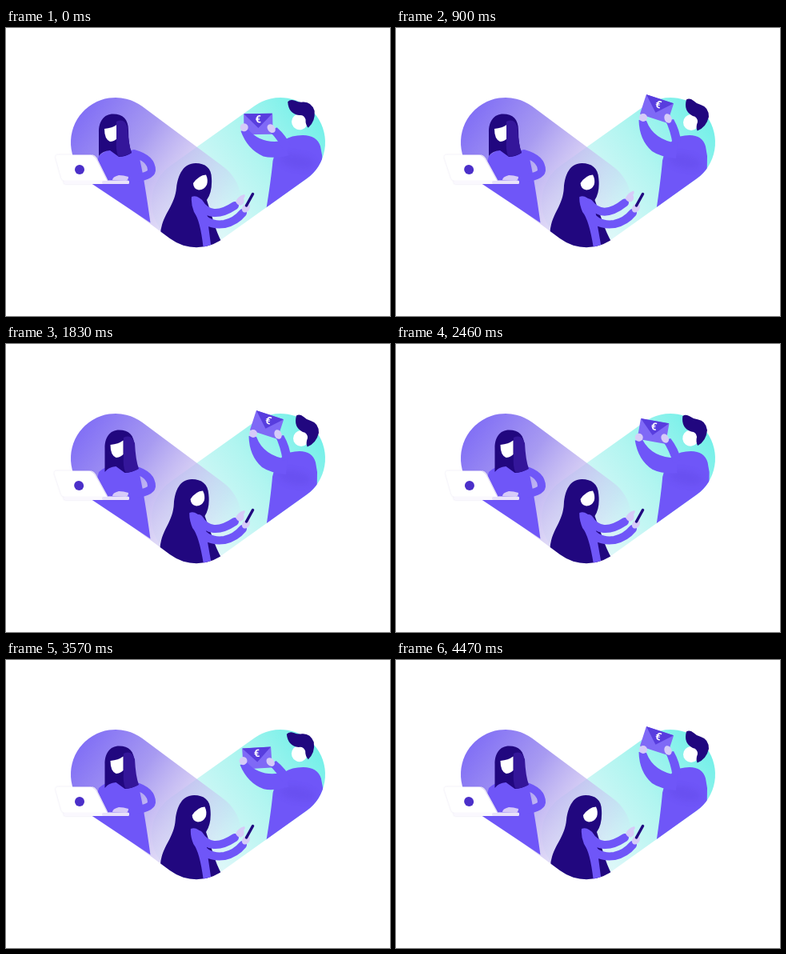
An HTML page that plays this animation: 480 by 360 pixels, repeating every 4500 ms.

```html
<!DOCTYPE html>
<html lang="en">
<head>
<meta charset="utf-8">
<title>Three people</title>
<style>
  @property --low  { syntax: "<number>"; inherits: true; initial-value: 0; }
  @property --turn { syntax: "<number>"; inherits: true; initial-value: 0; }
  @property --lean { syntax: "<number>"; inherits: true; initial-value: 0; }
  @property --tap  { syntax: "<number>"; inherits: true; initial-value: 0; }
  @property --pull { syntax: "<number>"; inherits: true; initial-value: 0; }
  @property --lid  { syntax: "<number>"; inherits: true; initial-value: 0; }

  html, body { margin: 0; width: 100%; height: 100%; overflow: hidden; background: #fff; }

  svg {
    display: block; width: 480px; height: 360px;
    animation: 4.5s ease-in-out infinite;
    animation-name: low, turn, lean, tap, pull, lid;
  }
  svg * { transform-box: view-box; }

  /* man: 1 = envelope lowered */
  @keyframes low {
    0% { --low: .79; animation-timing-function: cubic-bezier(.3, .3, .6, 1); }
    12.4%, 48% { --low: 0; }
    64.7%, 75.6% { --low: 1; }
    92.2%, 100% { --low: 0; }
  }
  /* laptop woman: 1 = looking right */
  @keyframes turn { 0%, 25.5% { --turn: 0; } 39%, 100% { --turn: 1; } }
  /* phone woman: 1 = leaning back */
  @keyframes lean {
    0%, 5% { --lean: 0; }
    18%, 72% { --lean: 1; }
    85%, 100% { --lean: 0; }
  }
  @keyframes tap  { 0%, 14% { --tap: 0; } 20% { --tap: 1; } 26%, 100% { --tap: 0; } }
  @keyframes pull { 0%, 81% { --pull: 0; } 86.7% { --pull: 1; } 93%, 100% { --pull: 0; } }
  @keyframes lid {
    0% { --lid: 0; }
    12%, 48% { --lid: 1; }
    56%, 85% { --lid: 0; }
    96%, 100% { --lid: 1; }
  }

  /* parts of the man turn about their own joint and drift by --x, --y when lowered */
  .swing {
    transform-origin: var(--joint);
    transform: translate(calc(var(--low) * var(--x)), calc(var(--low) * var(--y))) rotate(calc(var(--low) * -24deg));
  }
  .head     { --joint: 369px 119px; --x: -2px; --y: -1px; }
  .near     { --joint: 340px 152px; --x: 0px; --y: 0px; }
  .far      { --joint: 354px 146px; --x: 2px; --y: 8px; }
  .envelope { --joint: 326px 101px; --x: -13.5px; --y: 24px; }
  .body     { transform-origin: 328px 222px; transform: scaleX(calc(1 + var(--low) * .13)); }

  .look { transform: translateX(calc(var(--turn) * 7.5px)); }
  .lock { transform: translateX(calc(var(--turn) * 1.5px)); }
  .sway { transform-origin: 240px 270px; transform: skewX(calc(var(--lean) * 2.6deg)); }
  .tap  { transform-origin: 245px 220px;
          transform: translate(calc(var(--pull) * -5px), calc(var(--pull) * 1.5px)) rotate(calc(var(--tap) * -5deg)); }
  .lid  { transform-origin: 100px 193px; transform: skewX(calc(var(--lid) * 3deg)); }

  .dark { fill: #21077f; }
  .violet { fill: #6f56f8; }
  .skin { fill: #d6cbf8; }
  .white { fill: #fff; }
  .arm { fill: none; stroke: #6f56f8; stroke-width: 10; stroke-linecap: round; }
  .soft { filter: drop-shadow(0 0 1px rgba(90, 70, 170, .15)); }
  text { font: 700 13px Roboto, Arial, sans-serif; text-anchor: middle; fill: #fff; }
</style>
</head>
<body>
<svg viewBox="0 0 480 360">
  <defs>
    <linearGradient id="lilac" gradientUnits="userSpaceOnUse" x1="-56" x2="175">
      <stop offset="0" stop-color="#8270f5"/>
      <stop offset=".35" stop-color="#a89bf1"/>
      <stop offset=".62" stop-color="#c3b8f0" stop-opacity=".7"/>
      <stop offset=".85" stop-color="#c9c2f2" stop-opacity=".3"/>
      <stop offset="1" stop-color="#d6d2f6" stop-opacity="0"/>
    </linearGradient>
    <linearGradient id="aqua" gradientUnits="userSpaceOnUse" x1="-56" x2="170">
      <stop offset="0" stop-color="#74f0e9"/>
      <stop offset=".4" stop-color="#b0f5f0"/>
      <stop offset=".75" stop-color="#d6f7f7"/>
      <stop offset="1" stop-color="#f1fafc"/>
    </linearGradient>
    <filter id="blur" x="-50%" y="-50%" width="200%" height="200%"><feGaussianBlur stdDeviation="4"/></filter>
    <rect id="left" x="-56" y="-56" width="238" height="112" rx="56" transform="translate(137 143) rotate(36.6)"/>
    <rect id="right" x="-56" y="-56" width="241" height="112" rx="56" transform="translate(343 143) rotate(144.5)"/>
    <clipPath id="heart"><use href="#left"/><use href="#right"/></clipPath>
  </defs>

  <use href="#right" fill="url(#aqua)"/>
  <use href="#left" fill="url(#lilac)"/>

  <!-- woman with laptop -->
  <path class="violet" d="M116 160Q124 153 134 151H152Q166 154 168 168Q173 190 180.500 243.500L107 194.500Z"/>
  <path class="arm" d="M160 157Q182 163 182 178Q181 187 152 188"/>
  <g class="look">
    <path class="dark" d="M134 107.500C122 107.500 116 117 116 130V160Q120 154 130 153L141 161Q150 161 157 156Q153 146 153 128C153 114 146 107.500 134 107.500Z"/>
    <path class="white" d="M123 126Q133 125 139 120.500V138Q135 142 130 142Q123 139 123 126Z"/>
    <path class="lock" fill="#34169a" d="M138 117Q148 112 152 124Q153 145 157 156Q149 161 140 160Q137 152 138 140Z"/>
  </g>
  <g class="soft">
    <g class="lid">
      <path class="white" d="M65 158.500H106Q111 158.500 113 162L127 191H74Q70 191 69 187L62 162Q62 158.500 65 158.500Z"/>
      <path fill="none" stroke="#e2ddf5" stroke-width="1.500" d="M108 159Q111 160 113 163L126.500 190"/>
      <circle cx="92" cy="177" r="6" fill="#4b2fc9"/>
    </g>
    <rect x="72" y="190.500" width="82" height="4.500" rx="2" fill="#faf8fe"/>
  </g>
  <path class="skin" d="M153 186Q147 184 141 184Q133 186 133 190L150 191Q153 190 153 186Z"/>
  <rect x="120" y="191" width="34" height="4" rx="2" fill="#e8e2fa"/>

  <!-- man with envelope -->
  <g clip-path="url(#heart)">
    <g class="body">
      <path class="violet" d="M333 166Q336 150 346 140Q354 134 367 134Q383 134 387 148L389 160L388 230H325Q331 190 333 166Z"/>
      <ellipse cx="361" cy="167" rx="20" ry="8" fill="#4f39cf" opacity=".18" filter="url(#blur)" transform="rotate(12 361 167)"/>
    </g>
  </g>
  <g class="swing head">
    <circle class="white" cx="369" cy="118" r="10"/>
    <path class="dark" d="M363 89.500Q367 87 372 91Q376 95 381 96Q391 99 391 111Q388 124 376.600 128.600Q374.500 124 377 117.500Q377 111 371 110Q359 104 363 89.500Z"/>
  </g>
  <g class="swing envelope">
    <g transform="translate(326 101) rotate(18)">
      <rect x="-18" y="-13" width="36" height="26" rx="1" fill="#7f69f6"/>
      <path fill="#583dde" d="M-18 -13L0 5L18 -13Z"/>
      <text y="-1.500">€</text>
    </g>
  </g>
  <g class="swing near">
    <path class="violet" d="M303.500 115Q304 140 320 154Q330 161 350 163L352 144Q322 140 313 116Z"/>
    <circle class="skin" cx="309" cy="112" r="5"/>
  </g>
  <g class="swing far">
    <path class="violet" d="M337 116L347 114Q355 128 356 142L346 146Q343 128 337 116Z"/>
    <ellipse class="skin" cx="340" cy="113" rx="4.500" ry="6" transform="rotate(-20 340 113)"/>
  </g>

  <!-- woman with phone -->
  <g clip-path="url(#heart)">
    <g class="sway">
      <path class="dark" d="M237 169C222 169 215 183 213 200C211 220 200 229 195 246Q192 256 194 262Q200 280 240 280L275 278Q266 262 262 250L251 215Q258 205 257 188C257 175 249 169 237 169Z"/>
      <path class="white" d="M234 194Q241 184 250 183.500Q253 190 251 196Q248 202 241 202.500Q234 201 234 194Z"/>
      <path class="violet" d="M232 211Q240 208 247 218Q252 226 252 240L257 278H247Q243 240 235 230Q231 220 232 211Z"/>
    </g>
  </g>
  <path class="arm" d="M241 230Q250 248 273 245Q287 242 296 231"/>
  <ellipse class="skin" cx="300" cy="225" rx="4.500" ry="6" transform="rotate(35 300 225)"/>
  <path d="M300.500 222L308.500 207.500" fill="none" stroke="#21077f" stroke-width="3.500" stroke-linecap="round"/>
  <g class="tap">
    <path class="arm" d="M241 218Q256 242 286 222"/>
    <path class="skin" d="M287 217Q290 210 298 208Q300 210 297 213Q299 218 295 221Q290 223 287 217Z"/>
  </g>
</svg>
</body>
</html>
```
